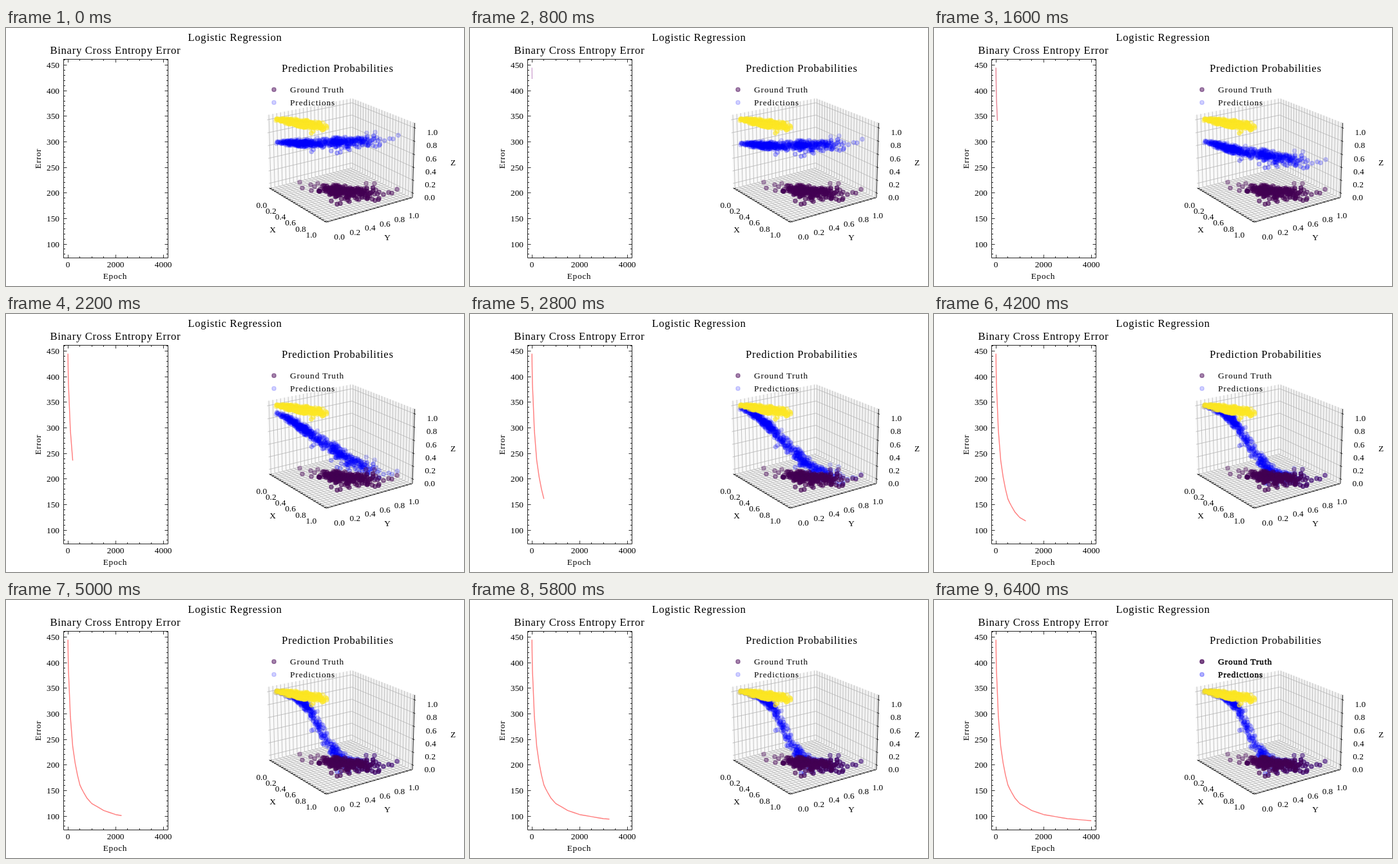
An HTML page with a canvas for the animation above (6.6 s loop, 711 by 400 pixels).

```html
<!DOCTYPE html>
<html lang="en">
<head>
<meta charset="utf-8">
<title>Logistic Regression</title>
<style>
  html, body { margin: 0; width: 100%; height: 100%; overflow: hidden; background: #fff; }
  canvas, svg { position: absolute; left: 0; top: 0; width: 711px; height: 400px; }
  text { font: 13.33px "Liberation Serif", "Times New Roman", serif; fill: #000; }
  .title { font-size: 16.67px; letter-spacing: .042em; }
  .label { letter-spacing: .05em; }
  .legend { letter-spacing: .07em; }
  .strong .legend { stroke: #000; stroke-width: .5px; }
</style>
</head>
<body>
<canvas id="plot" width="711" height="400"></canvas>
<svg id="labels" viewBox="0 0 711 400"></svg>
<script>
const ctx = document.getElementById('plot').getContext('2d');
const svg = document.getElementById('labels');
const STEP = 200;

// Epoch shown at each step
const epochs = [0, 1, 2, 3, 5, 10, 20, 40, 60, 80, 100, 200, 300, 400,
  500, 575, 650, 725, 800, 900];
for (let e = 1000; e <= 4000; e += 250) epochs.push(e);

const errors = [[0, 445], [5, 423], [20, 385], [60, 341], [100, 295], [200, 236],
  [300, 204], [400, 180], [500, 161], [600, 151], [800, 135], [1000, 124.5],
  [1500, 111], [2000, 103], [2250, 101], [3000, 95], [4000, 91]];
// Model by epoch: bias and slope
const biases = [[0, .6], [5, .51], [60, .64], [500, 3], [800, 3.8], [2250, 5.6], [4000, 6.6]];
const slopes = [[0, -.56], [5, -.4], [60, .41], [500, 4], [800, 5.2], [2250, 7.7], [4000, 9.2]];

function lerpTable(table, x, scale = v => v) {
  let i = 1;
  while (i < table.length - 1 && x > table[i][0]) i++;
  const [x0, y0] = table[i - 1], [x1, y1] = table[i];
  return y0 + (y1 - y0) * (scale(x) - scale(x0)) / (scale(x1) - scale(x0));
}

let seed = 11;
function random() {
  seed = (seed + 0x6D2B79F5) | 0;
  let t = Math.imul(seed ^ seed >>> 15, 1 | seed);
  t = t + Math.imul(t ^ t >>> 7, 61 | t) ^ t;
  return ((t ^ t >>> 14) >>> 0) / 4294967296;
}
const gauss = () => Math.sqrt(-2 * Math.log(1 - random())) * Math.cos(2 * Math.PI * random());
const clamp = (v, lo, hi) => Math.max(lo, Math.min(hi, v));

// Perspective camera
const az = -35 * Math.PI / 180, el = 20 * Math.PI / 180;
const view = [Math.cos(el) * Math.cos(az), Math.cos(el) * Math.sin(az), Math.sin(el)];
const right = [-Math.sin(az), Math.cos(az), 0];
const up = [-Math.sin(el) * Math.cos(az), -Math.sin(el) * Math.sin(az), Math.cos(el)];
const ZOOM = 1362, DIST = 10, CX = 518.3, CY = 199;
const LO = -.073, HI = 1.073, WIDE = 1.19 / (HI - LO), TALL = .893 / (HI - LO);
const dot = (a, b) => a[0] * b[0] + a[1] * b[1] + a[2] * b[2];
const world = (x, y, z) => [(x - .5) * WIDE, (y - .5) * WIDE, (z - .5) * TALL];

function project(x, y, z) {
  const w = world(x, y, z), k = ZOOM / (DIST - dot(w, view));
  return [CX + k * dot(w, right), CY - k * dot(w, up)];
}

// Data x, y of a screen place on the plane at height z
function unproject(px, py, z) {
  const a = px - CX, b = CY - py, h = (z - .5) * TALL, far = DIST - view[2] * h;
  const m = [0, 1].map(i => ZOOM * right[i] + a * view[i]);
  const n = [0, 1].map(i => ZOOM * up[i] + b * view[i]);
  const p = a * far, q = b * far - ZOOM * up[2] * h;
  const det = m[0] * n[1] - m[1] * n[0];
  return [(p * n[1] - m[1] * q) / det / WIDE + .5, (m[0] * q - p * n[0]) / det / WIDE + .5];
}

const points = [];
function addPoint(px, py, z) {
  const [x, y] = unproject(px, py, z);
  points.push({ x, y, z, depth: dot(world(x, y, 0), view) });
}
for (let i = 0; i < 330; i++) {
  let px;
  do px = 457 + 19 * gauss(); while (px < 419 || px > 498);
  const spread = Math.min(1.1 + .05 * (px - 418), 3);
  addPoint(px, 142 + .15 * (px - 420) + spread * clamp(gauss(), -1.9, 1.9), 1);
}
addPoint(474, 163, 1);
addPoint(477, 160, 1);
for (let i = 0; i < 260; i++) {
  const tail = i % 5 === 0;
  let px;
  do px = tail ? 552 + 20 * gauss() : 520 + 19 * gauss(); while (px < 485 || px > 592);
  const py = 253 + .08 * (px - 520) + (tail ? 5.5 : 4.4) * gauss();
  addPoint(px, clamp(py, 243 - .04 * (px - 520), 250 + .35 * (px - 478)), 0);
}
[[456, 239], [460, 248], [473, 243], [474, 252], [479, 246], [484, 241], [505, 268],
 [514, 273], [519, 272], [533, 269], [559, 241], [572, 241], [562, 263], [579, 264],
 [594, 255], [599, 256], [607, 250]].forEach(([x, y]) => addPoint(x, y, 0));
points.sort((a, b) => a.depth - b.depth);
const near = points[points.length - 1].depth, far = points[0].depth;

function stroke(path, color, width) {
  ctx.beginPath();
  path.forEach(([x, y], i) => i ? ctx.lineTo(x, y) : ctx.moveTo(x, y));
  ctx.strokeStyle = color;
  ctx.lineWidth = width;
  ctx.stroke();
}
const line3 = (a, b, color = '#b0b0b0', width = .75) =>
  stroke([project(...a), project(...b)], color, width);

function pane(corners, color) {
  ctx.beginPath();
  corners.forEach(c => ctx.lineTo(...project(...c)));
  ctx.closePath();
  ctx.fillStyle = color;
  ctx.fill();
}

function marker(x, y, rgb, alpha) {
  ctx.beginPath();
  ctx.arc(x, y, 3.1, 0, 2 * Math.PI);
  ctx.fillStyle = ctx.strokeStyle = `rgba(${rgb},${alpha})`;
  ctx.lineWidth = 1.4;
  ctx.fill();
  ctx.stroke();
}

const epochX = e => 96.2 + e * .037;
const errorY = e => 57.5 + (450 - e) * .793;
const snap = v => Math.floor(v) + .5;

function drawChart(step) {
  ctx.strokeStyle = '#000';
  ctx.lineWidth = .85;
  ctx.strokeRect(89.5, 48.5, 162, 308);
  for (let e = 0; e <= 4000; e += 500) {
    const x = snap(epochX(e)), len = e % 2000 ? 2.5 : 5;
    stroke([[x, 356.5], [x, 356.5 - len]], '#000', .8);
    stroke([[x, 48.5], [x, 48.5 + len]], '#000', .8);
  }
  for (let e = 80; e <= 460; e += 10) {
    const y = snap(errorY(e)), len = e % 50 ? 2.5 : 5;
    stroke([[89.5, y], [89.5 + len, y]], '#000', .8);
    stroke([[251.5, y], [251.5 - len, y]], '#000', .8);
  }
  if (!step) return;
  const color = step < 6 ? '#c592c8' : step < 11 ? '#e58595' : '#ff7f7f';
  ctx.lineJoin = 'round';
  stroke(epochs.slice(0, step + 1).map(e => [epochX(e), errorY(lerpTable(errors, e))]),
    color, step < 6 ? 1.1 : 1.45);
}

function drawBox() {
  pane([[LO, LO, LO], [LO, HI, LO], [LO, HI, HI], [LO, LO, HI]], '#f9f9f9');
  pane([[LO, HI, LO], [HI, HI, LO], [HI, HI, HI], [LO, HI, HI]], '#f2f2f2');
  pane([[LO, LO, LO], [HI, LO, LO], [HI, HI, LO], [LO, HI, LO]], '#f6f6f6');
  for (let i = -1; i <= 21; i++) {
    const t = i / 20;
    stroke([project(t, LO, LO), project(t, HI, LO), project(t, HI, HI)], '#b0b0b0', .75);
    stroke([project(HI, t, LO), project(LO, t, LO), project(LO, t, HI)], '#b0b0b0', .75);
    line3([t, LO - .01, LO], [t, LO + .02, LO], '#000');
    line3([HI + .01, t, LO], [HI - .02, t, LO], '#000');
  }
  for (let i = 0; i <= 5; i++) {
    const t = i / 5;
    stroke([project(LO, LO, t), project(LO, HI, t), project(HI, HI, t)], '#b0b0b0', .75);
    line3([HI - .02, HI, t], [HI + .02, HI, t], '#000');
  }
  line3([LO, LO, LO], [HI, LO, LO], '#000', .85);
  line3([HI, LO, LO], [HI, HI, LO], '#000', .85);
  line3([HI, HI, LO], [HI, HI, HI], '#000', .85);
}

const BLUE = '0,0,255', PURPLE = '68,1,84', YELLOW = '253,231,37';

function drawScatter(step) {
  const log = v => Math.log(v + 1);
  const bias = lerpTable(biases, epochs[step], log);
  const slope = lerpTable(slopes, epochs[step], log);
  const shade = p => .55 + .45 * (p.depth - far) / (near - far);
  for (const p of points) {
    const z = 1 / (1 + Math.exp(slope * (p.x + p.y) - bias));
    marker(...project(p.x, p.y, z), BLUE, .25 * shade(p));
  }
  for (const p of points)
    marker(...project(p.x, p.y, p.z), p.z ? YELLOW : PURPLE, .6 * shade(p));
}

function draw(step) {
  const last = step === epochs.length - 1;
  ctx.fillStyle = '#fff';
  ctx.fillRect(0, 0, 711, 400);
  drawChart(step);
  drawBox();
  drawScatter(step);
  marker(416, 95.5, PURPLE, last ? .7 : .48);
  marker(416, 115.5, BLUE, last ? .3 : .18);
  svg.classList.toggle('strong', last);
}

function label(str, x, y, anchor = 'middle', kind = '', turn = 0) {
  const t = document.createElementNS('http://www.w3.org/2000/svg', 'text');
  t.textContent = str;
  t.setAttribute('x', x);
  t.setAttribute('y', y);
  t.setAttribute('text-anchor', anchor);
  if (kind) t.setAttribute('class', kind);
  if (turn) t.setAttribute('transform', `rotate(${turn} ${x} ${y})`);
  svg.append(t);
}

label('Logistic Regression', 355.5, 20, 'middle', 'title');
label('Binary Cross Entropy Error', 169.8, 40, 'middle', 'title');
label('Prediction Probabilities', 514.8, 68, 'middle', 'title');
label('Ground Truth', 441, 99.5, 'start', 'legend');
label('Predictions', 441, 119.5, 'start', 'legend');
label('Epoch', 169.5, 389, 'middle', 'label');
label('Error', 53.5, 202.5, 'middle', 'label', -90);
label('X', 414, 316.5);
label('Y', 592, 329);
label('Z', 694, 212.5);
for (let e = 0; e <= 4000; e += 2000) label(e, epochX(e), 371);
for (let e = 100; e <= 450; e += 50) label(e, 83, errorY(e) + 4.5, 'end');
for (let i = 0; i <= 5; i++) {
  const t = i / 5, str = t.toFixed(1);
  const mark = (at, dx, dy) => label(str, at[0] + dx, at[1] + dy + 4.5);
  mark(project(t, LO, LO), -17, 23.5);
  mark(project(HI, t, LO), 11.5 - 1.5 * t, 25);
  mark(project(HI, HI, t), 26.5 + t, 6.5);
}

let shown = -1;
function tick(now) {
  const step = Math.floor(now / STEP) % epochs.length;
  if (step !== shown) draw(shown = step);
  requestAnimationFrame(tick);
}
draw(shown = 0);
requestAnimationFrame(tick);
</script>
</body>
</html>
```
